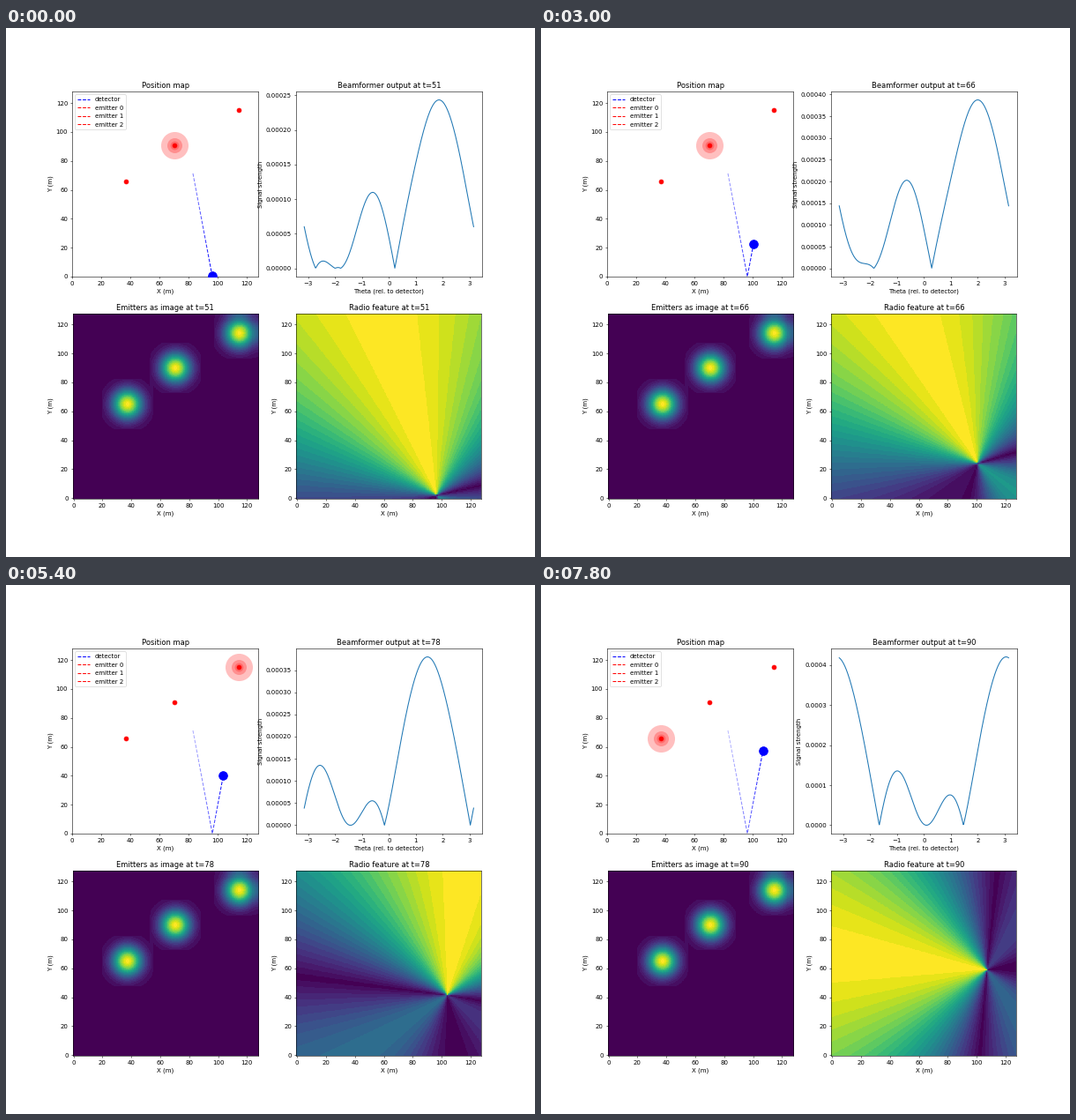
Animation of 600 by 600 pixels, one loop 8 s. Source, as a matplotlib script:

```python
import numpy as np
import matplotlib.pyplot as plt
from matplotlib.animation import FuncAnimation
from matplotlib.collections import LineCollection
from matplotlib.colors import ListedColormap

SIZE = 128
FRAMES, STEP_MS, T0 = 40, 200, 51
EMITTERS = np.array([(37.2, 65.7), (70.5, 90.8), (114.5, 114.9)])
# Which emitter transmits at each step
ACTIVE = [int(c) for c in "1201022102012121121020100102012001201210"]
THETA = np.linspace(-np.pi, np.pi, 360)
GRID_Y, GRID_X = np.mgrid[0:SIZE, 0:SIZE]


def position(step):
    """Detector path: straight motion that bounces off the y = 0 wall."""
    return 96.4 + 0.274 * step, abs(0.45 + 1.465 * step)


def beam(theta, alpha, dist):
    """Response of a four-element cross array, half a wavelength wide."""
    u = np.pi / 2 * (np.cos(alpha) - np.cos(theta))
    v = np.pi / 2 * (np.sin(alpha) - np.sin(theta))
    return 2.09 / dist**2 * np.abs(np.cos(u) + np.cos(v)) / 2


def bell(center, sigma=7, radius=17):
    """Truncated Gaussian along one axis, mirrored at the far border."""
    total = np.zeros(SIZE)
    for c in (center, 2 * SIZE - 1 - center):
        d = np.arange(SIZE) - c
        total += np.where(abs(d) <= radius, np.exp(-d**2 / (2 * sigma**2)), 0)
    return total


def emitter_image():
    return sum(np.outer(bell(y), bell(x)) for x, y in np.floor(EMITTERS))


def trail(step):
    """Dashes along the path so far, fading with age."""
    starts = np.arange(-49, step, 2.237)
    ends = np.minimum(starts + 1.56, step)
    dashes = [(position(a), position(b)) for a, b in zip(starts, ends)]
    colors = [(0, 0, 1, np.exp((b - step) / 65)) for b in ends]
    return dashes, colors


shades = np.round(np.linspace(0, 1, 256) * 28) / 28
banded = ListedColormap(plt.get_cmap("viridis")(shades))

fig, ((ax_map, ax_beam), (ax_img, ax_radio)) = plt.subplots(
    2, 2, figsize=(12, 12), dpi=50)

for ax in (ax_map, ax_img, ax_radio):
    ax.set_xlabel("X (m)")
    ax.set_ylabel("Y (m)")

ax_map.set_title("Position map")
ax_map.set_xlim(0, SIZE)
ax_map.set_ylim(0, SIZE)
ax_map.plot([], [], "b--", label="detector")
for i in range(len(EMITTERS)):
    ax_map.plot([], [], "r--", label=f"emitter {i}")
ax_map.legend(loc="upper left")
rings = [ax_map.scatter([0], [0], s=s, c="red", alpha=0.25, linewidths=0, zorder=2)
         for s in (2000, 600, 200)]
ax_map.scatter(*EMITTERS.T, s=50, c="red", zorder=3)
path = LineCollection([], linewidths=1.5, zorder=2)
ax_map.add_collection(path, autolim=False)
detector = ax_map.scatter([0], [0], s=200, c="blue", zorder=3)

curve, = ax_beam.plot(THETA, np.zeros_like(THETA))
ax_beam.set_xlabel("Theta (rel. to detector)")
ax_beam.set_ylabel("Signal strength")

ax_img.imshow(emitter_image(), origin="lower", cmap=banded)
radio = ax_radio.imshow(np.zeros((SIZE, SIZE)), origin="lower", cmap=banded)


def update(step):
    t = T0 + step
    source = EMITTERS[ACTIVE[step]]
    for ring in rings:
        ring.set_offsets([source])
    detector.set_offsets([position(step)])
    dashes, colors = trail(step)
    path.set_segments(dashes)
    path.set_color(colors)

    # The reading is taken after the detector has moved on
    px, py = position(step + 1)
    dx, dy = source[0] - px, source[1] - py
    alpha, dist = np.arctan2(dy, dx), np.hypot(dx, dy)
    curve.set_ydata(beam(THETA, alpha, dist))
    ax_beam.relim()
    ax_beam.autoscale_view()

    field = beam(np.arctan2(GRID_Y - py, GRID_X - px), alpha, dist)
    radio.set_data(field)
    radio.set_clim(field.min(), field.max())

    ax_beam.set_title(f"Beamformer output at t={t}")
    ax_img.set_title(f"Emitters as image at t={t}")
    ax_radio.set_title(f"Radio feature at t={t}")
    return []


anim = FuncAnimation(fig, update, frames=FRAMES, interval=STEP_MS,
                     init_func=lambda: update(0), repeat=True, repeat_delay=0)
plt.show()
```
